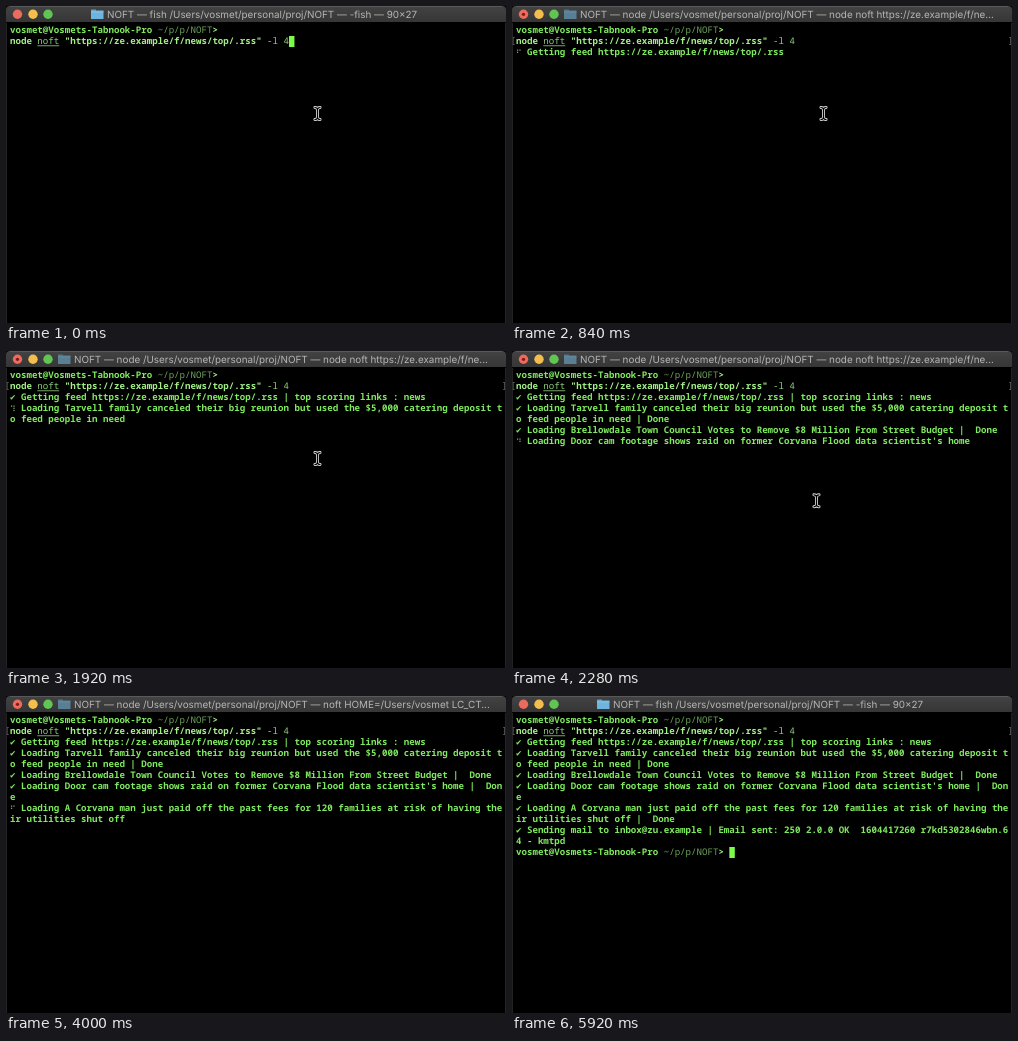
These frames come from a looping animation (500 px wide and 317 px high, 5960 ms). An HTML page with a canvas:

```html
<!DOCTYPE html>
<html lang="en">
<head>
<meta charset="utf-8">
<title>Terminal</title>
<style>
  html, body { margin: 0; width: 100%; height: 100%; overflow: hidden; background: #000; }
  canvas { display: block; }
</style>
</head>
<body>
<canvas id="stage" width="500" height="317"></canvas>
<script>
const ctx = document.getElementById('stage').getContext('2d');
ctx.textRendering = 'geometricPrecision';

const LOOP = 5960, COLS = 90, CELL = 5.47, LINE = 11, LEFT = 4, TOP = 19;
const GREEN = '#7fe95f', PALE = '#a3ee88', SOFT = '#8fce7a', DIM = '#6ca35a', CURSOR = '#7dfb4b';
const SPINNER = '⠋⠙⠹⠸⠼⠴⠦⠧⠇⠏';
const URL_TEXT = 'https://ze.example/f/news/top/.rss';

// Times in ms: start, done; then the text and what is appended when done.
const tasks = [
  [780, 1720, 'Getting feed ' + URL_TEXT, ' | top scoring links : news'],
  [1720, 1960, 'Loading Tarvell family canceled their big reunion but used the $5,000 catering deposit to feed people in need', ' | Done'],
  [1960, 2160, 'Loading Brellowdale Town Council Votes to Remove $8 Million From Street Budget', ' |  Done'],
  [2160, 3140, "Loading Door cam footage shows raid on former Corvana Flood data scientist's home", ' |  Done'],
  [3140, 4080, 'Loading A Corvana man just paid off the past fees for 120 families at risk of having their utilities shut off', ' |  Done'],
  [4080, 5280, 'Sending mail to inbox@zu.example', ' | Email sent: 250 2.0.0 OK  1604417260 r7kd5302846wbn.64 - kmtpd']
];

const colX = col => LEFT + col * CELL;
const rowY = row => TOP + row * LINE;

function rect(x, y, w, h, color) {
  ctx.fillStyle = color;
  ctx.fillRect(x, y, w, h);
}

function disc(x, y, r, color) {
  ctx.fillStyle = color;
  ctx.beginPath();
  ctx.arc(x, y, r, 0, 7);
  ctx.fill();
}

// Writes on the character grid, wrapping at the last column; returns the next free row.
function write(col, row, text, color = GREEN, weight = 700) {
  ctx.font = `${weight} 9.12px "Noto Sans Mono", "DejaVu Sans Mono", monospace`;
  ctx.fillStyle = color;
  for (const char of text) {
    if (col === COLS) { col = 0; row++; }
    ctx.fillText(char, colX(col++), rowY(row) + 8.2);
  }
  return row + 1;
}

function block(col, row) {
  rect(colX(col), rowY(row), CELL, LINE, CURSOR);
}

function prompt(row) {
  write(0, row, 'vosmet@Vosmets-Tabnook-Pro');
  write(27, row, '~/p/p/NOFT', DIM, 400);
  write(37, row, '>', PALE);
}

function spinner(row, step) {
  const bits = SPINNER.charCodeAt(step % 10) & 63;
  for (let i = 0; i < 6; i++) {
    if (bits >> i & 1) rect(5 + (i > 2) * 2.4, rowY(row) + 2.5 + i % 3 * 2.2, 1.2, 1.2, '#8fb580');
  }
}

// Shortens a text with an ellipsis until it fits the width.
function truncate(text, width) {
  if (ctx.measureText(text).width <= width) return text;
  while (ctx.measureText(text + '...').width > width) text = text.slice(0, -1);
  return text + '...';
}

function titleBar(t) {
  const running = t >= 120 && t < 5400;
  const shade = ctx.createLinearGradient(0, 0, 0, 16);
  shade.addColorStop(0, '#434344');
  shade.addColorStop(1, '#363637');
  ctx.fillStyle = shade;
  ctx.beginPath();
  ctx.roundRect(0, 0, 500, 16, [4, 4, 0, 0]);
  ctx.fill();
  rect(4, 0, 492, 0.7, '#646465');

  disc(11.5, 8.3, 4.7, '#ec6a5e');
  disc(27, 8.3, 4.7, '#f4be4f');
  disc(42, 8.3, 4.7, '#61c554');
  if (running) disc(11.5, 8.3, 1.6, '#7d1a14');

  const x = running ? 52 : 85;
  rect(x, 3.5, 5, 3, running ? '#4d7489' : '#559fcc');
  rect(x, 4.5, 12.5, 8.5, running ? '#587f94' : '#6fb4dd');
  rect(x, 5.7, 12.5, 0.6, running ? '#6d93a6' : '#93cdea');

  const path = '/Users/vosmet/personal/proj/NOFT';
  const title = !running ? `NOFT — fish ${path} — -fish — 90×27`
    : t < 3900 ? `NOFT — node ${path} — node noft ${URL_TEXT}`
    : `NOFT — node ${path} — noft HOME=/Users/vosmet LC_CTYPE=UTF-8`;
  ctx.font = '400 9.9px Inter, sans-serif';
  ctx.fillStyle = '#b6b6b5';
  ctx.fillText(truncate(title, 420), x + 16, 12);
}

function bracket(x, open) {
  rect(open ? x : x + 1.2, 31, 0.8, 8, '#5c5c5c');
  rect(x, 31, 2, 0.8, '#5c5c5c');
  rect(x, 38.2, 2, 0.8, '#5c5c5c');
}

function pointer(t) {
  const u = Math.max(0, t - 1920) / 360;
  const x = 311.5 - 7 * u, y = 107.5 + 42 * u ** 2.65;
  if (y > 330) return;
  const beam = new Path2D(`M${x - 2.6} ${y - 6}q2.6 0 2.6 2.2v7.6q0 2.2-2.6 2.2` +
    `M${x + 2.6} ${y - 6}q-2.6 0-2.6 2.2v7.6q0 2.2 2.6 2.2`);
  ctx.lineCap = 'round';
  for (const [width, color] of [[2.9, '#ddd'], [1.2, '#000']]) {
    ctx.lineWidth = width;
    ctx.strokeStyle = color;
    ctx.stroke(beam);
  }
}

function draw(t) {
  rect(0, 0, 500, 317, '#000');
  rect(0, 17, 0.5, 300, '#444');
  rect(499.5, 17, 0.5, 300, '#444');
  titleBar(t);

  prompt(0);
  write(0, 1, 'node', PALE);
  write(5, 1, 'noft', SOFT, 400);
  rect(colX(5), rowY(1) + 9.4, 4 * CELL, 0.8, SOFT);
  write(10, 1, `"${URL_TEXT}"`, PALE);
  write(47, 1, '-l 4', SOFT, 400);

  if (t < 40) block(51, 1);
  else {
    bracket(0.8, true);
    bracket(497, false);
    if (t < 720) block(0, 2);
  }

  // The spinner stalls while the third page is being processed.
  const clock = t > 2600 && t < 3080 ? 2600 : t;
  let row = 2;
  for (const [start, done, text, result] of tasks) {
    if (t < start) break;
    const finished = t >= done;
    if (finished) write(0, row, '✔');
    else spinner(row, Math.floor((clock - start) / 80));
    row = write(2, row, text + (finished ? result : ''));
  }

  if (t >= 5360) {
    prompt(row);
    block(39, row);
  }
  pointer(t);
}

function tick() {
  draw(performance.now() % LOOP);
  requestAnimationFrame(tick);
}
tick();
</script>
</body>
</html>
```
